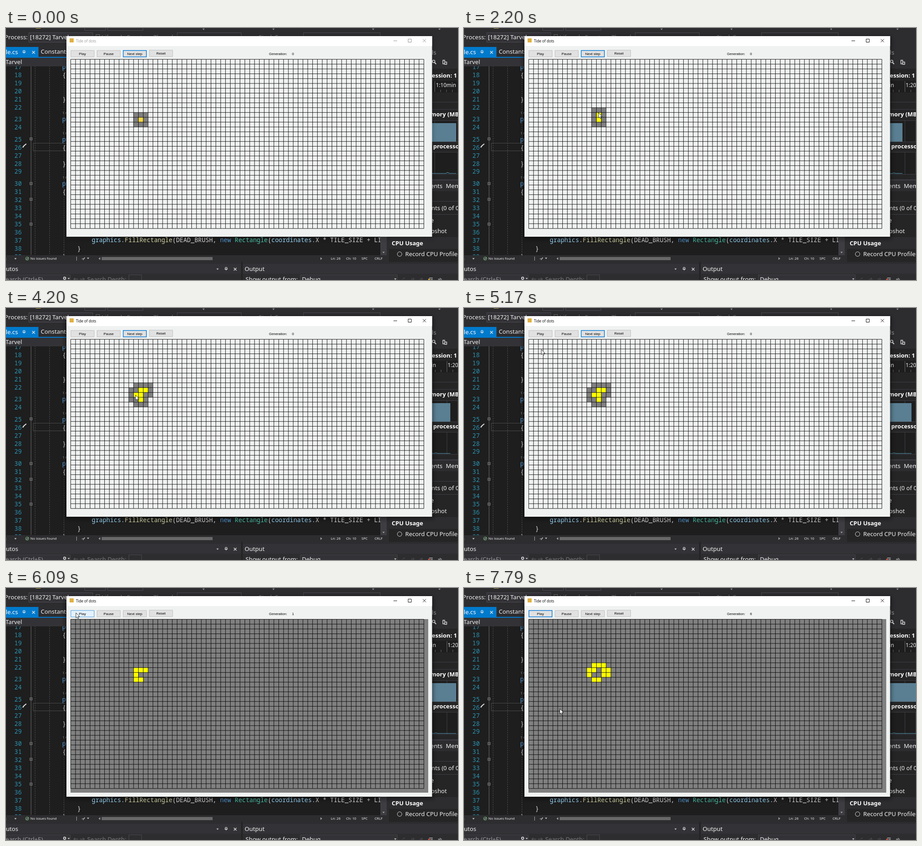
Recreate the animation shown at these times as an HTML page. Size 1002 px wide and 559 px high, loop 8000 ms.

```html
<!DOCTYPE html>
<html lang="en">
<head>
<meta charset="utf-8">
<title>Cell grid</title>
<style>
  html, body { margin: 0; width: 100%; height: 100%; overflow: hidden; background: #2d2d30; }
  svg { display: block; width: 1002px; height: 559px; }
  text { white-space: pre; }
  .ui { font-family: "Noto Sans", sans-serif; }
  .code { font-family: "Noto Sans Mono", monospace; }
  .form { font-family: "Liberation Sans", Arial, sans-serif; }
  .title { font-family: "Open Sans", sans-serif; }
</style>
</head>
<body>
<svg id="stage" viewBox="0 0 1002 559"></svg>
<script>
const LOOP = 8000;
const stage = document.getElementById('stage');

function add(tag, attrs, text) {
  const el = document.createElementNS('http://www.w3.org/2000/svg', tag);
  for (const k in attrs) el.setAttribute(k, attrs[k]);
  if (text !== undefined) el.textContent = text;
  stage.appendChild(el);
  return el;
}
const rect = (x, y, w, h, fill, stroke) => add('rect', stroke
  ? { x: x + .5, y: y + .5, width: w - 1, height: h - 1, fill, stroke }
  : { x, y, width: w, height: h, fill });
const path = (d, stroke, width = 1, fill = 'none') =>
  add('path', { d, stroke, 'stroke-width': width, fill });
const label = (x, y, str, size = 13.2, fill = '#f1f1f1', cls = 'ui', weight = 400) =>
  add('text', { x, y, fill, class: cls, 'font-size': size, 'font-weight': weight }, str);
const bold = (x, y, str) => label(x, y, str, 13, '#fff', 'ui', 700);
const code = (x, y, str, fill = '#dcdcdc') => label(x, y, str, 13.55, fill, 'code');
const drop = (x, y, fill = '#ccc') => path(`M${x - 2.5} ${y - 1.5}h5l-2.5 3z`, 'none', 0, fill);
const cross = (x, y, r) => path(`M${x - r} ${y - r}l${2 * r} ${2 * r}m0 ${-2 * r}l${-2 * r} ${2 * r}`, '#eee', 1.2);
const pin = (x, y) => path(`M${x - 2} ${y - 3}h4v4h-4zm-1.5 4h7m-3.5 0v3`, '#eee');

function drawToolbars() {
  rect(0, 0, 1002, 559, '#2d2d30');
  rect(66, 0, 11, 1, '#b8963c');
  rect(174, -8, 47, 14, '#2d2d30', '#4b4b50');
  rect(225, -8, 79, 14, '#2d2d30', '#4b4b50');
  for (const x of [438, 593, 814, 961]) drop(x, 3, '#999');
  label(-3, 25, 'Process:');
  rect(50, 10, 143, 22, '#333337', '#4b4b50');
  label(53, 25, '[18272] Tarvel.exe');
  rect(199, 14, 9, 9, 'none', '#6d6d70');
  label(212, 25, 'Lifecycle Events', 13.2, '#77777a');
  label(327, 25, 'Thread:', 13.2, '#77777a');
  rect(379, 10, 143, 22, '#2d2d30', '#4b4b50');
  label(560, 25, 'Stack Frame:', 13.2, '#77777a');
  rect(659, 10, 171, 22, '#2d2d30', '#4b4b50');
}

function drawEditor() {
  rect(0, 84, 848, 420, '#1e1e1e');
  const rows = [86, 104, 122, 140, 158, 176, 202, 220, 247, 265, 283, 301, 318,
    345, 363, 381, 399, 417, 435, 453, 471, 489, 507];
  rows.forEach((y, i) => code(18.5, y + 5, 17 + i, '#2b91af'));
  path('M55.5 84V503', '#6a6a6a');
  path('M64.5 84V503M96.5 84V503M128.5 84V503', '#4c4c4c').setAttribute('stroke-dasharray', '3 2');
  for (const y of [246, 345, 380, 435]) {
    rect(52.5, y - 3, 6, 6, '#1e1e1e', '#8a8a8a');
    path(`M54 ${y}h3`, '#bbb', .8);
  }
  rect(60, 255, 90, 18, 'none', '#4a4a4a');
  path('M37 265l3-4 5-4', '#ddd', 2.2);
  for (const y of [86, 202, 247, 345]) code(124.5, y + 5, 'public', '#569cd6');
  for (const y of [104, 265, 363]) code(125, y + 5, '{');
  for (const y of [158, 301, 507]) code(125, y + 5, '}');
  for (const y of [188, 233, 331]) label(125, y + 3, '1 reference', 7.5, '#999');

  const parts = [['graphics', '#9cdcfe'], ['.'], ['FillRectangle', '#dcdcaa'], ['(DEAD_BRUSH, '],
    ['new ', '#569cd6'], ['Rectangle', '#4ec9b0'], ['('], ['coordinates', '#9cdcfe'],
    ['.X * TILE_SIZE + LINE']];
  let col = 0;
  for (const [str, fill] of parts) {
    code(190 + col * 8.13, 475, str, fill);
    col += str.length;
  }
  code(158, 494, '}');
  rect(830, 462, 14, 42, '#3e3e42');
  drop(837, 498, '#aaa');

  rect(0, 42, 72, 23, '#007acc');
  label(-.5, 58, 'le.cs', 13.2, '#fff');
  pin(40, 53);
  cross(61, 54, 3);
  label(77, 57, 'Constants.cs');
  rect(0, 64, 848, 2, '#007acc');
  rect(0, 66, 848, 19, '#333337');
  label(-1, 80, 'Tarvel');

  rect(0, 504, 848, 15, '#2d2d30');
  label(-3, 515, 's', 8, '#eee');
  drop(21, 512);
  add('circle', { cx: 47, cy: 511.5, r: 3.5, fill: 'none', stroke: '#7ecb7e' });
  path('M45 511.5l1.5 1.5 3-3.5', '#e8f8e8');
  label(54, 514, 'No issues found', 7.7);
  path('M156.5 507v9', '#aaa');
  path('M168 512h5l2-3m-4 6l3-6', '#ccc');
  drop(182, 511);
  path('M209 508.5v6l-4-3zM697 508.5v6l4-3z', 'none', 0, '#999');
  rect(212, 508, 246, 7, '#686868');
  label(720, 514, 'Ln: 26', 7.7);
  label(754, 514, 'Ch: 10', 7.7);
  label(788, 514, 'SPC', 7.7);
  label(817, 514, 'CRLF', 7.7);
}

function drawPanels() {
  rect(0, 519, 1002, 40, '#2d2d30');
  rect(0, 523, 521, 22, '#333337');
  rect(525, 523, 477, 22, '#333337');
  rect(521, 519, 4, 40, '#252526');
  label(-8.5, 539, 'Autos');
  drop(469, 535);
  pin(488, 534);
  cross(508, 535, 3);
  label(529, 539, 'Output');
  rect(0, 547, 143, 20, '#333337', '#434346');
  label(-8, 562, 'Search (Ctrl+E)', 13.2, '#98989a');
  add('circle', { cx: 130, cy: 555, r: 2.5, fill: 'none', stroke: '#eee', 'stroke-width': 1.4 });
  drop(139, 556);
  path('M160 557h-10l4-3m-4 3l4 3M164 557h10l-4-3m4 3l-4 3', '#68686b');
  label(180, 562, 'Search Depth:', 13.2, '#77777a');
  rect(272, 547, 29, 20, '#2d2d30', '#4b4b50');
  label(531, 562, 'Show output from:');
  rect(652, 547, 216, 20, '#333337', '#434346');
  label(656, 562, 'Debug');
  drop(863, 557);
  path('M879 557l5-3M898 557h7l-3-3M917 557h7l-3-3', '#5a5a5d');
  path('M938 554.5h8M941 557.5h5', '#ddd');
  label(957, 561, 'ab', 8, '#ddd');
}

const view = {};

function drawDiagnostics() {
  rect(848, 42, 154, 477, '#252526');
  rect(848, 42, 154, 23, '#2d2d30');
  label(944, 59, 'ls', 13.2, '#a0a0a0');
  rect(848, 65, 154, 25, '#2d2d30');
  add('circle', { cx: 948, cy: 74, r: 2.8, fill: 'none', stroke: '#ddd', 'stroke-width': 1.6 });
  path('M949.500 76l4 4', '#ddd', 2);
  path('M968.500 71.500h4v8h-4zM972.500 75.500h4.500v5h-4.500z', '#ddd', 1.4);
  bold(944, 110, 'ession: 1');
  rect(940, 117, 62, 26, '#1e1e1e');
  view.early = label(953, 131, '1:10min', 11.8);
  view.late = add('g', {});
  view.late.append(label(943, 131, 'in', 11.8), label(979, 131, '1:20min', 11.8));
  view.ticks = path('', '#6a6a6d');
  rect(940, 164, 62, 1, '#3f3f46');
  rect(940, 180, 62, 1, '#3f3f46');
  bold(941, 196, 'mory (MB)');
  rect(940, 205, 62, 48, '#1e1e1e', '#3f3f46');
  bold(947, 267, 'processors)');
  rect(940, 275, 62, 50, '#1e1e1e', '#3f3f46');
  view.grid = path('', '#3f3f46');
  view.mem = rect(940, 211, 58, 41, '#5a7f93');
  view.cpu = path('', '#4f94ad', 1.2);
  rect(940, 336, 62, 2, '#3f3f46');
  rect(940, 338, 62, 24, '#2d2d30');
  label(941, 355, 'ents');
  label(975, 355, 'Memory Usage');
  rect(940, 384, 62, 1, '#3f3f46');
  label(943, 404, 'nts (0 of 0)');
  rect(940, 413, 62, 1, '#3f3f46');
  label(941, 431, 'e');
  label(942, 455, 'pshot');
  rect(849, 464, 153, 26, '#2d2d30');
  bold(855, 482, 'CPU Usage');
  add('circle', { cx: 872.5, cy: 501.5, r: 5, fill: 'none', stroke: '#ddd' });
  label(885, 506, 'Record CPU Profile');
  rect(844, 462, 5, 57, '#2d2d30');
}

// The form is a 15 px tile layout shown at SCALE, so its lines fall between pixels.
const SCALE = .715, COLS = 73, ROWS = 35, SIZE = 15 * SCALE;
const lineX = i => 143.4 + i * SIZE;
const lineY = i => 69.4 + i * SIZE;

function button(x, y, str) {
  const box = add('rect', { x: x + .7, y: y + .7, width: 51.4, height: 14.2,
    fill: '#e1e1e1', stroke: '#adadad', 'stroke-width': SCALE });
  label(x + 26.3, y + 10.700, str, 7.9, '#000', 'form').setAttribute('text-anchor', 'middle');
  return box;
}

function drawWindow() {
  view.shadow = rect(131, 19, 816, 449, '#000');
  view.shadow.style.filter = 'blur(5px)';
  rect(134, 18, 810.5, 445, '#f0f2f1');
  rect(134, 18, 810.5, 22, '#fff');
  rect(141, 23, 9, 9, '#e0b040');
  view.title = label(155, 31.5, 'Tide of dots', 8.2, '#000', 'title');
  view.caption = path('M859 28.500h8M891.500 24.500h7v7h-7zM924 24.500l7 7m0-7l-7 7', '#000', .9);
  view.play = button(143.2, 49.2, 'Play');
  button(201.2, 49.2, 'Pause');
  view.next = button(259.2, 49.2, 'Next step');
  button(317.2, 48.4, 'Reset');
  label(583, 60, 'Generation:', 7.7, '#000', 'form');
  view.count = label(634, 60, '0', 7.9, '#000', 'form');
  view.panel = rect(143, 69, 793, 385, '#808080');
  view.dead = path('', 'none', 0, '#808080');
  view.live = path('', 'none', 0, '#ff0');
  let d = '';
  for (let i = 0; i <= COLS; i++) d += `M${lineX(i)} ${lineY(0)}V${lineY(ROWS)}`;
  for (let j = 0; j <= ROWS; j++) d += `M${lineX(0)} ${lineY(j)}H${lineX(COLS)}`;
  path(d, '#000', .9);
  view.halo = add('circle', { cx: 155, cy: 57.5, r: 9, fill: '#f4ee3c', 'fill-opacity': .7 });
  view.cursor = path('M0 0V11.500L2.600 9.200 4.300 13 6.200 12.200 4.500 8.500H8.200Z', '#000', .8, '#fff');
}

// Cells painted by hand: [column, row, time]
const clicks = [[14, 12, 0], [14, 11, 2050], [14, 10, 2590], [15, 10, 3200], [13, 11, 4040]];
const ticks = [6090, 6390, 6780, 7090, 7410, 7790];

function around(cells) {
  const map = new Map();
  for (const [x, y] of cells)
    for (let i = -1; i < 2; i++)
      for (let j = -1; j < 2; j++) {
        const key = `${x + i},${y + j}`;
        map.set(key, (map.get(key) || 0) + 1);
      }
  return map;
}
const toCell = key => key.split(',').map(Number);

// Counts include the cell itself, so a live cell survives on 3 or 4.
function evolve(cells) {
  const alive = new Set(cells.map(String));
  return [...around(cells)]
    .filter(([key, n]) => n === 3 || (n === 4 && alive.has(key)))
    .map(([key]) => toCell(key));
}
const gens = [clicks.map(([x, y]) => [x, y])];
ticks.forEach(() => gens.push(evolve(gens[gens.length - 1])));

const cellPath = cells => cells.map(([x, y]) =>
  `M${lineX(x)} ${lineY(y)}H${lineX(x + 1)}V${lineY(y + 1)}H${lineX(x)}z`).join('');

// Pointer: [time, x, y]
const moves = [[360, 210, 559], [700, 218, 360], [950, 238, 235], [1130, 264, 198], [1280, 293, 200],
  [1360, 294, 196], [1510, 294, 196], [1590, 295, 195], [1740, 296, 195], [1820, 297, 194],
  [1970, 297, 192], [2200, 298, 188], [2510, 298, 182], [2740, 303, 181], [2970, 306, 182],
  [3200, 305, 181], [3360, 303, 182], [3590, 302, 183], [4000, 287, 192], [4200, 287, 193],
  [4450, 284, 191], [5250, 159, 81], [5400, 154, 63], [5860, 155, 54], [6090, 155, 55],
  [6320, 155, 55], [6600, 178, 145], [6860, 212.5, 268]];

function track(list, t) {
  const i = list.findIndex(p => p[0] > t);
  if (i < 0) return list[list.length - 1];
  if (i === 0) return list[0];
  const a = list[i - 1], b = list[i], k = (t - a[0]) / (b[0] - a[0]);
  return a.map((v, n) => v + (b[n] - v) * k);
}
const set = (el, attrs) => { for (const k in attrs) el.setAttribute(k, attrs[k]); };
const show = (el, on) => set(el, { visibility: on ? 'visible' : 'hidden' });

function drawCharts(t) {
  const late = t >= 2050, major = late ? 977.5 : 950.5;
  const edge = late
    ? Math.min(1002, Math.floor(971 + (t - 2050) * .0069))
    : 998 + (t >= 190 ? 2 : 0) + (t >= 1000 ? 2 : 0);
  show(view.early, !late);
  show(view.late, late);
  let d = `M${major} 118V142`;
  for (let x = major - 26; x < 1002; x += 13) if (x > 944) d += `M${x} 137v5`;
  set(view.ticks, { d });
  set(view.grid, { d: `M${major} 206V252M${major} 276V324` });
  set(view.mem, { width: edge - 940 });
  const bump = late ? 953 : 979;
  set(view.cpu, { d: `M944 322.5H${bump - 4}l4 ${late ? -1 : -2} 4 ${late ? 1 : 2}H${edge}` });
}

function drawGame(t) {
  const gen = ticks.filter(s => t >= s).length;
  const cells = gen ? gens[gen] : clicks.filter(c => t >= c[2]);
  view.count.textContent = gen;
  show(view.panel, gen > 0);
  set(view.live, { d: cellPath(cells), fill: t < 1970 ? '#f5d742' : '#ff0' });
  set(view.dead, { d: gen ? '' : cellPath([...around(cells).keys()].map(toCell)) });
}

function drawControls(t) {
  const active = t >= 1970, pressed = t >= 5860 && t < 6090;
  const hover = t >= 5400 && t < 6390, focus = t >= 5860;
  set(view.title, { fill: active ? '#000' : '#999' });
  set(view.caption, { stroke: active ? '#000' : '#888' });
  set(view.shadow, { opacity: active ? .45 : .2 });
  set(view.play, {
    fill: pressed ? '#cce4f7' : hover ? '#e5f1fb' : '#e1e1e1',
    stroke: pressed ? '#005499' : hover || focus ? '#0078d7' : '#adadad',
    'stroke-width': SCALE * (focus && !hover ? 2 : 1)
  });
  set(view.next, { stroke: focus ? '#adadad' : '#0078d7', 'stroke-width': SCALE * (focus ? 1 : 2) });
  show(view.halo, pressed);
  show(view.cursor, t >= 360);
  const [, x, y] = track(moves, t);
  set(view.cursor, { transform: `translate(${x} ${y})` });
  set(view.clear, { stroke: t < 1000 ? '#e0b83c' : '#e05a4e' });
}

drawToolbars();
drawEditor();
drawDiagnostics();
drawPanels();
view.clear = path('M936 557.5h4', '#e0b83c', 2.5);
drawWindow();

const start = performance.now();
function frame() {
  const t = (performance.now() - start) % LOOP;
  drawCharts(t);
  drawGame(t);
  drawControls(t);
  requestAnimationFrame(frame);
}
frame();
</script>
</body>
</html>
```
